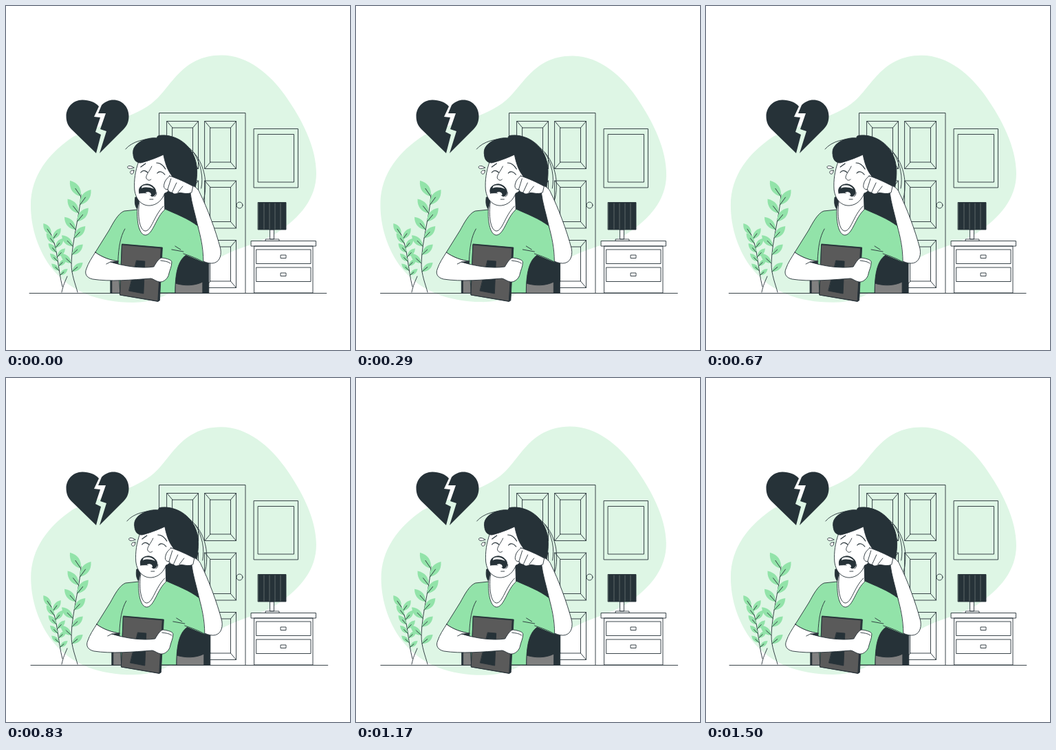
Recreate the animation shown at these times as an HTML page. Size 500x500 px, loop 1.54 s.

```html
<!DOCTYPE html>
<html lang="en">
<head>
<meta charset="utf-8">
<title>Heartbreak</title>
<style>
html, body { margin: 0; width: 100%; height: 100%; overflow: hidden; background: #fff; }
svg { display: block; width: 100vw; height: 100vh; }
g { stroke: #263238; stroke-width: .9; stroke-linecap: round; stroke-linejoin: round; fill: none; }
.skin { fill: #fff; }
.green { fill: #92e3a9; }
.dark { fill: #263238; }
.case { fill: #5a5a5a; }
.seat { fill: #808080; }
.bare { stroke: none; }
.pleat { stroke: #76807f; stroke-width: .7; }
</style>
</head>
<body>
<svg viewBox="0 0 500 500">
  <path id="blob" fill="#def6e5" d="M313 71.5C352 71.5 384 100 405 129C430 164 451 205 451 243C451 280 427 307 396 328C370 346 333 350 300 372C270 392 240 431 185 431C135 431 95 416 68 383C47 357 36 322 36 290C36 247 62 214 98 190C133 173 180 165 211 142C239 122 253 71.5 313 71.5Z"/>

  <g id="door">
    <path d="M222.5 417V155.5H348V417"/>
    <circle cx="339.5" cy="289.5" r="4.5"/>
  </g>
  <g id="plants"></g>
  <g id="furniture">
    <path d="M360.5 178.5H424.5V264H360.5ZM366.5 186.5H418.5V256H366.5Z"/>
    <path class="skin" d="M361 349H446V417H361ZM356.5 341.5H450.5V349H356.5Z"/>
    <path class="skin" d="M384 325H389.5V339H384ZM377.5 339H397V341.5H377.5Z"/>
    <path class="dark" d="M366.5 285.5H407V325H366.5Z"/>
  </g>

  <path fill="#263238" d="M135 146C130 140 121 136.5 111 136.5C97 136.5 87.5 148 87.5 160C87.5 168 90 174 95 179L131 214L138 187L130 183L137 162L128 161ZM139 144C144 139 150 136.5 156 136.5C169 136.5 178.500 147 178.500 160C178.500 168 176 174 171 179L136 214L146 182L137 179L145 156L134 156Z"/>

  <g id="woman">
    <path d="M34.2 417.5H466"/>

    <!-- chair -->
    <path class="dark" d="M152 417V330C153 318 162 309 172 305V417ZM240 417V357H286L295 371V417Z"/>
    <path class="seat" d="M154 417V389H167V417ZM246 417V403C259 407 274 407 286 401V417Z"/>

    <!-- hair behind the shoulders -->
    <path class="dark" d="M222 189C242 185 263 197 272 215C280 231 278 247 276 261C272 281 280 299 281 322L224 300L194 298C187 293 187 285 188 278L230 272L226 214Z"/>
    <path d="M174 208C183 197 203 191 224 194M266 206C282 219 290 240 290 260Q290 276 286 285M273 213C284 230 287 249 284 265"/>

    <!-- shirt -->
    <path class="green" d="M191 296L172 298C163 301 155 317 150 326L130 358C139 365 153 370 163 371L166 417H246C246 389 250 370 262 362C272 365 280 370 288 373L291 352L279 320C266 309 246 302 229 294Z"/>
    <path d="M173 324C166 336 164 351 163 370M241 354L258 357M254 354L246 349"/>
    <path class="skin" d="M191 295C190 315 194 333 203 333C214 332 218 307 231 296L230 268L195 278Z"/>
    <path d="M194 285C191 304 194 327 203 327C212 326 215 305 229 291"/>

    <!-- head -->
    <path class="skin" d="M193 226C188 240 186 253 187 267C189 283 199 291 210 290C220 289 227 282 231 272C240 270 245 252 241 236L230 214Z"/>
    <path class="dark" d="M185 214C183 200 204 190 220 192C219 189 222 188 227 188C248 187 267 205 273 224C278 243 275 258 271 266C258 260 244 253 240 245C234 237 231 226 229 216C216 222 204 226 196 228C189 228 185 223 185 214Z"/>
    <path stroke-width="1.2" d="M196 242C199 238 203 239 206 242M220 243C223 239 228 241 231 245M196 234L203 229M219 228C225 228 229 232 232 237"/>
    <path d="M212 233C209 240 203 246 204 250C206 254 209 254 211 252M219 271C219 274 218 276 216 277M209 281H214"/>
    <path class="dark" d="M194 272C191 263 200 258 207 259C213 260 218 265 218 270C218 275 214 278 211 276C207 270 199 272 194 272Z"/>
    <path class="skin bare" d="M198 262C204 259 212 261 215 266C208 263 202 263 197 265ZM203 271C208 269 212 272 211 275C208 275 205 273 203 271Z"/>
    <path class="skin" d="M186 235C181 231 176 232 177 235C178 237 182 237 186 235ZM186 239C181 238 179 242 182 244C185 245 186 242 186 239Z"/>

    <!-- raised arm -->
    <path class="skin" d="M279 320C275 302 270 287 268 271L270 261C275 262 280 266 282 272C292 292 305 326 312 353C314 365 309 374 299 374C294 374 288 372 283 369Z"/>
    <path class="green bare" d="M270 315L279 320C283 335 286 351 287 372L262 362Z"/>
    <path d="M279 320C283 335 287 351 287 372C278 367 270 364 258 360"/>
    <path class="skin" d="M238 247C248 250 263 257 272 262L270 271C262 275 255 270 250 272C246 274 243 273 242 271C238 271 236 269 236 267C230 267 229 263 230 259C231 253 235 250 238 247Z"/>
    <path d="M240 251L235 267M248 257L242 270M257 262L250 271"/>

    <!-- laptop -->
    <path class="dark" d="M169 346L227.500 351L223.500 428L221 429.500L166 420Z"/>
    <path class="case" d="M169 347L225.500 352L221 429L166 420Z"/>
    <path class="dark" d="M190 370L202 371L200 418L179 414Z"/>

    <!-- holding arm -->
    <path class="skin" d="M130 358C139 365 153 370 164 371L152 372C171 378 196 382 215 379C219 372 223 366 227 366C234 367 242 369 241 373C241 379 238 384 237 389C236 396 229 402 223 401C218 400 215 397 211 396C184 398 151 401 126 397C117 395 114 389 117 382C120 373 125 366 130 358Z"/>
    <path d="M225 370C231 371 235 371 239 374M146 375L152 372"/>
  </g>
</svg>
<script>
const $ = id => document.getElementById(id);

function add(parent, d, className = "") {
  const path = document.createElementNS("http://www.w3.org/2000/svg", "path");
  path.setAttribute("d", d);
  path.setAttribute("class", className);
  return $(parent).appendChild(path);
}

const box = (x, y, w, h) => `M${x} ${y}h${w}v${h}h${-w}Z`;

function panel(x, y, w = 45.5, h = 69, dx = 8, dy = 9.5) {
  let bevels = "";
  for (const sx of [0, 1]) for (const sy of [0, 1])
    bevels += `M${x + sx * w} ${y + sy * h}l${dx - sx * 2 * dx} ${dy - sy * 2 * dy}`;
  add("door", box(x, y, w, h) + box(x + dx, y + dy, w - 2 * dx, h - 2 * dy) + bevels);
}

function leaf(x, y, angle, length) {
  const at = (along, across) => {
    const c = Math.cos(angle), s = Math.sin(angle);
    return `${x + s * along * length + c * across * length} ${y - c * along * length + s * across * length}`;
  };
  add("plants", `M${x} ${y}Q${at(.5, .42)} ${at(1, 0)}Q${at(.5, -.42)} ${x} ${y}`, "green bare");
  add("plants", `M${x} ${y}L${at(.5, 0)}`);
}

// Leaves alternate sides from the tip down and get smaller.
function grow(stem, count, size) {
  const path = add("plants", stem), total = path.getTotalLength();
  for (let i = 0; i < count; i++) {
    const t = i / count, { x, y } = path.getPointAtLength(total * (.02 + .85 * t));
    leaf(x, y, (i % 2 ? 1 : -1) * (.6 + .3 * t), size * (1 - .3 * t));
  }
}

for (let row = 0; row < 3; row++) for (const x of [234, 289]) panel(x, 167.5 + row * 86.5);
for (const y of [354, 380]) add("furniture", box(364, y, 79, 20.5) + box(399.5, y + 8, 7.5, 4.5));
for (let x = 375; x < 407; x += 8) add("furniture", `M${x} 287V324`, "pleat");
grow("M109 274C107 306 96 340 95 374C95 391 101 404 104 416", 10, 28);
grow("M65 331C76 354 75 382 82 408", 10, 20);
add("plants", "M81 416C83 406 86 400 89 393");

const LOOP = 1540, CYCLE = 1500, FPS = 24, PHASE = 25;

// Ten swings per cycle that double up to 4 px and die away the same way.
function swing(key) {
  const k = Math.min(key, 10 - key);
  return k > 0 ? (-1) ** k * Math.min(4, 2 ** (k - 1)) : 0;
}

function shake(p) {
  const k = Math.floor(p * 10);
  return swing(k) + (swing(k + 1) - swing(k)) * (p * 10 - k);
}

const triangle = p => Math.asin(Math.sin(2 * Math.PI * p)) * 2 / Math.PI;

function draw() {
  const step = Math.floor((performance.now() % LOOP + 5) * FPS / 1000);
  const p = (step * 1000 / FPS + PHASE) % CYCLE / CYCLE;
  $("woman").setAttribute("transform", `translate(${shake(p)} 0)`);
  $("blob").setAttribute("transform", `rotate(${triangle(p)} 243.5 251)`);
  requestAnimationFrame(draw);
}
draw();
</script>
</body>
</html>
```
